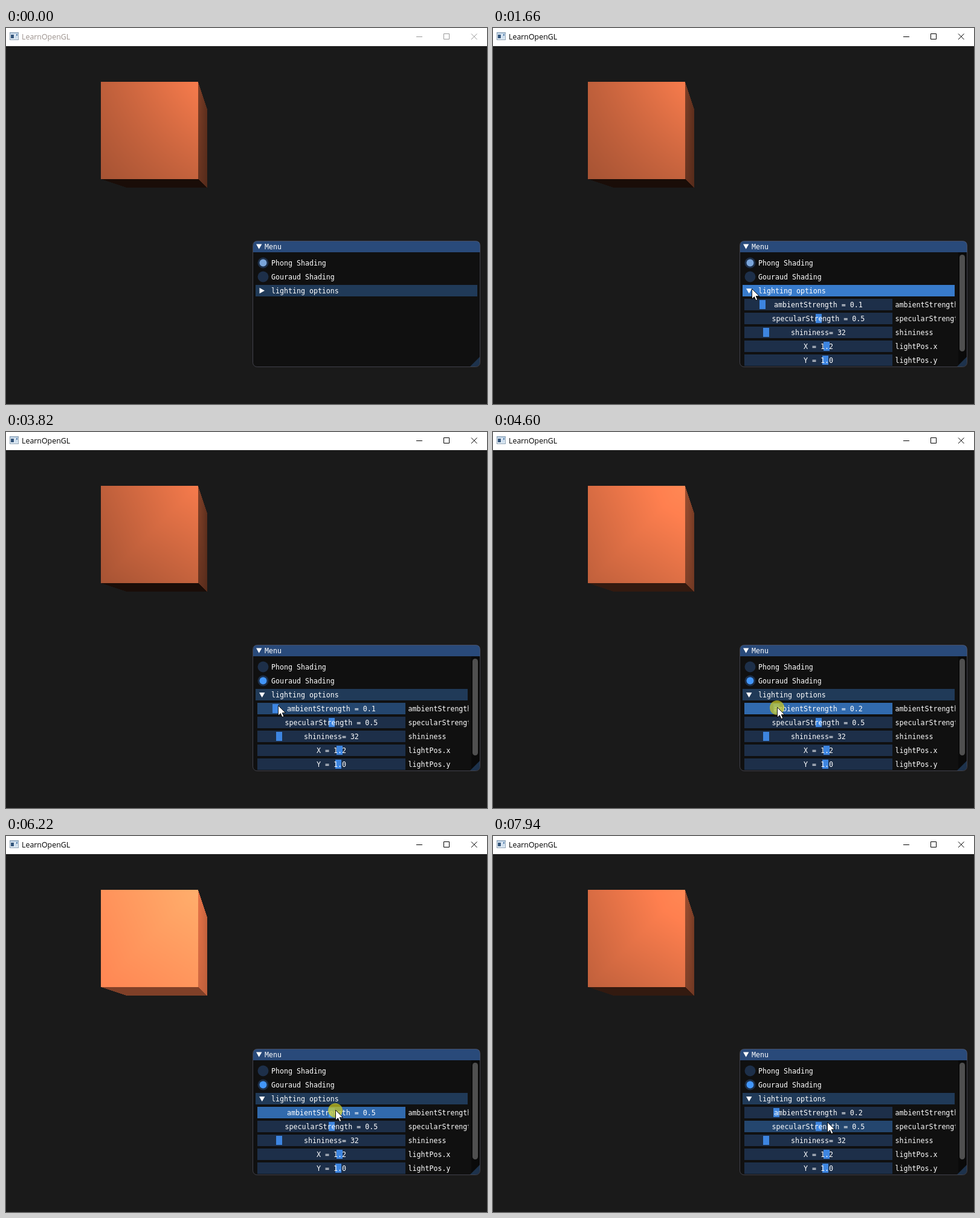
Write an HTML page with a canvas that moves like this. It is 796 px wide and 622 px high and loops after 8000 ms.

```html
<!DOCTYPE html>
<html lang="en">
<head>
<meta charset="utf-8">
<title>LearnOpenGL</title>
<style>
  html, body { margin: 0; width: 100%; height: 100%; overflow: hidden; background: #1a1a1a; }
  canvas, svg { position: absolute; left: 0; top: 0; display: block; }
  .ui { font: 11.627px "DejaVu Sans Mono", monospace; fill: #fff; white-space: pre; }
  .title { font: 12.4px "Open Sans", "Noto Sans", sans-serif; }
</style>
</head>
<body>
<canvas id="scene" width="796" height="622"></canvas>
<svg id="ui" width="796" height="622" viewBox="0 0 796 622"></svg>
<script>
const LOOP = 8000;
const ui = document.getElementById('ui');
const ctx = document.getElementById('scene').getContext('2d');

// Pointer moves: start time, end time, steps, destination x, y.
const START = [644, 634];
const MOVES = [
  [340, 800, 7, 427, 434],
  [1660, 1660, 1, 428, 432],
  [1737, 2120, 6, 427, 411],
  [2730, 2884, 3, 432, 383],
  [3200, 3354, 3, 433, 403],
  [3740, 3820, 2, 450, 453],
  [3890, 3960, 2, 456, 459],
  [4170, 4210, 2, 452, 455],
  [4370, 5060, 10, 497, 457],
  [5290, 5290, 1, 511, 457],
  [5367, 5600, 4, 562, 457],
  [5750, 5900, 3, 618, 456],
  [6170, 6170, 1, 575, 455],
  [6220, 6220, 1, 545, 454],
  [6300, 6860, 8, 459, 455],
  [7318, 7630, 5, 530, 480],
  [7708, 7940, 4, 553, 474]
];
const PRESSES = [[950, 1030], [2970, 3050], [3430, 3510], [4370, 7240]];
const FOCUS = 950, OPEN = 1030, DRAG = PRESSES[3];
const RADIO_CLICKS = [2350, 3050, 3510];

function pointer(t) {
  let [x, y] = START;
  for (const [t0, t1, n, tx, ty] of MOVES) {
    if (t < t0) break;
    const done = n === 1 ? 1 : Math.min(n, 1 + Math.floor((t - t0) / (t1 - t0) * (n - 1) + 1e-6));
    x += (tx - x) * done / n;
    y += (ty - y) * done / n;
  }
  return [Math.round(x), Math.round(y)];
}

function ambient(t) {
  if (t < DRAG[0]) return 0.1;
  const x = pointer(Math.min(t, DRAG[1] - 1))[0];
  return Math.round((x - 423) / 231 * 10) / 10;
}

// ---- Lit cube ----
const EYE = [1, -1, 5], LIGHT = [1.2, 1, 2], COLOR = [255, 127.5, 79];
const FOCAL = 724.3, CX = 398.4, CY = 330.3;
const BOX = { x: 150, y: 80, w: 190, h: 192 };

function diffuse(p, axis) {
  const l = LIGHT.map((v, i) => v - p[i]);
  return Math.max(0, l[axis] / Math.hypot(...l));
}

const frontPoint = (u, v) => [u - 0.5, v - 0.5, 0.5];
const sidePoint = (u, v) => [0.5, v - 0.5, u - 0.5];

function makeFace(point, axis) {
  const at = (u, v) => diffuse(point(u, v), axis);
  const a = at(0, 0), b = at(1, 0), c = at(1, 1), d = at(0, 1);
  return (u, v, smooth) => {
    if (smooth) return at(u, v);
    return u > v ? a * (1 - u) + b * (u - v) + c * v
                 : a * (1 - v) + d * (v - u) + c * u;
  };
}
const front = makeFace(frontPoint, 2), side = makeFace(sidePoint, 0);
const inside = (u, v) => u >= 0 && u <= 1 && v >= 0 && v <= 1;

// Diffuse light at a screen point, or -1 outside the cube.
function trace(px, py, smooth) {
  const dx = (px - CX) / FOCAL, dy = (CY - py) / FOCAL;
  let u = EYE[0] + dx * 4.5 + 0.5, v = EYE[1] + dy * 4.5 + 0.5;
  if (inside(u, v)) return front(u, v, smooth);
  let s = -0.5 / dx;
  u = EYE[2] - s + 0.5; v = EYE[1] + dy * s + 0.5;
  if (inside(u, v)) return side(u, v, smooth);
  s = 0.5 / dy;
  u = EYE[0] + dx * s + 0.5; v = EYE[2] - s + 0.5;
  return inside(u, v) ? 0 : -1;
}

function drawCube(amb, smooth) {
  const img = ctx.createImageData(BOX.w, BOX.h);
  for (let j = 0, k = 0; j < BOX.h; j++) {
    for (let i = 0; i < BOX.w; i++, k += 4) {
      const lit = trace(BOX.x + i + 0.5, BOX.y + j + 0.5, smooth);
      if (lit < 0) continue;
      COLOR.forEach((c, n) => { img.data[k + n] = c * (lit + amb); });
      img.data[k + 3] = 255;
    }
  }
  ctx.putImageData(img, BOX.x, BOX.y);
}

// ---- Interface ----
const FRAME = ['#1d2f49', '#24466e', '#316aad'];
const HEADER = ['#203a58', '#387bcb', '#387bcb'];
const rect = (x, y, w, h, fill, more = '') =>
  `<rect x="${x}" y="${y}" width="${w}" height="${h}" fill="${fill}" ${more}/>`;
const path = (d, fill, more = '') => `<path d="${d}" fill="${fill}" ${more}/>`;
const disc = (x, y, r, fill) => `<circle cx="${x}" cy="${y}" r="${r}" fill="${fill}"/>`;
const text = (x, y, s) => `<text class="ui" x="${x}" y="${y}">${s}</text>`;

function titleBar(focused) {
  const ink = focused ? '#000' : '#999';
  return rect(0, 0, 796, 30, '#fff') +
    rect(6.5, 7.5, 14, 12, '#e6eef5', 'stroke="#8ba0b4"') +
    rect(7, 8, 13, 2, '#b5cbe0') + rect(8, 11, 5, 6, '#33557c') +
    rect(14, 11, 5, 7, '#cfdfee') + rect(17, 10, 2, 3, '#5d86b0') +
    `<text class="title" x="26" y="19" fill="${focused ? '#000' : '#9b918c'}">LearnOpenGL</text>` +
    path('M679 14.5h10M724.5 9.5h9v9h-9zM770 9.5l9.5 9.5M779.5 9.5l-9.5 9.5', 'none', `stroke="${ink}"`);
}

function radio(y, label, on, state, mark) {
  return disc(425.5, y, 9, FRAME[state]) + (on ? disc(425.5, y, 6, mark) : '') +
    text(439, y + 4.5, label);
}

function slider(y, caption, label, pos, state) {
  const x = 538.5 - caption.length * 3.5;
  const grab = Math.round(418 + pos * 231);
  return rect(416, y - 10, 245, 19, FRAME[state]) +
    rect(grab, y - 8, 10, 15, state === 2 ? '#4296fa' : '#3d85e0') +
    text(x, y + 4, caption) + text(665.5, y + 4, label);
}

function menu(s) {
  const width = s.open ? 351 : 367;
  let out = rect(408.5, 352.5, 376, 208, '#101010', 'rx="7"') +
    path('M409 371V359.5q0 -7 7 -7h361.5q7 0 7 7V371z', '#294a7a') +
    path('M414 357.5h9.4l-4.7 8.3z', '#fff') + text(428, 366, 'Menu') +
    radio(388.5, 'Phong Shading', s.phong, s.item(379), '#7aa5da') +
    radio(411.5, 'Gouraud Shading', !s.phong, s.item(402), '#4296fa') +
    rect(413, 425, width, 19, HEADER[s.item(425)]) +
    path(s.open ? 'M419 431h9.4l-4.7 8.3z' : 'M419.5 429.8v9.4l8.5 -4.7z', '#fff') +
    text(439, 439, 'lighting options');
  if (s.open) {
    const amb = s.amb.toFixed(1);
    out += '<g clip-path="url(#content)">' +
      slider(458, 'ambientStrength = ' + amb, 'ambientStrength', s.amb, s.item(448)) +
      slider(481, 'specularStrength = 0.5', 'specularStrength', 0.5, s.item(471)) +
      slider(504, 'shininess= 32', 'shininess', 0.125, 0) +
      slider(527, 'X = 1.2', 'lightPos.x', 0.56, 0) +
      slider(550, 'Y = 1.0', 'lightPos.y', 0.55, 0) + '</g>' +
      path('M770 371h14v182q0 7 -7 7h-7z', '#0a0a0a') +
      rect(772, 375, 9, 160, '#4f4f4f', 'rx="4.5"');
  }
  return out + path('M784 544v9q0 7 -7 7h-9z', '#1d324c') +
    rect(408.5, 352.5, 376, 208, 'none', 'rx="7" stroke="#6e6e80" stroke-opacity=".5"');
}

function cursor(x, y, down) {
  const arrow = 'M0.5 0.5v16.8l3.9 -3.7 2.6 6 2.8 -1.2 -2.6 -5.8h5.4z';
  return (down ? `<circle cx="${x}" cy="${y}" r="12" fill="#c8c823" fill-opacity=".73"/>` : '') +
    path(arrow, '#fff', `stroke="#000" stroke-width=".9" transform="translate(${x} ${y - 1})"`);
}

const CLIP = '<clipPath id="content"><rect x="409" y="371" width="356.5" height="189"/></clipPath>';
let lastUi = '', lastCube = '';

function render(t) {
  const [x, y] = pointer(t);
  const down = PRESSES.some(([a, b]) => t >= a && t < b);
  const focused = t >= FOCUS;
  const dragging = t >= DRAG[0] && t < DRAG[1];
  const state = {
    open: t >= OPEN,
    phong: RADIO_CLICKS.filter(c => t >= c).length % 2 === 0,
    amb: ambient(t),
    // 0 idle, 1 hovered, 2 held
    item(top) {
      if (dragging) return top === 448 ? 2 : 0;
      const over = focused && x >= 413 && x < 661 && y >= top && y < top + 19;
      return over ? (down ? 2 : 1) : 0;
    }
  };

  const markup = CLIP + titleBar(focused) + menu(state) +
    (t >= MOVES[0][0] ? cursor(x, y, down) : '');
  if (markup !== lastUi) ui.innerHTML = lastUi = markup;

  const cube = state.amb + '/' + state.phong;
  if (cube !== lastCube) drawCube(state.amb, state.phong);
  lastCube = cube;
}

const begin = performance.now();
function tick() {
  render((performance.now() - begin) % LOOP);
  requestAnimationFrame(tick);
}
tick();
</script>
</body>
</html>
```
